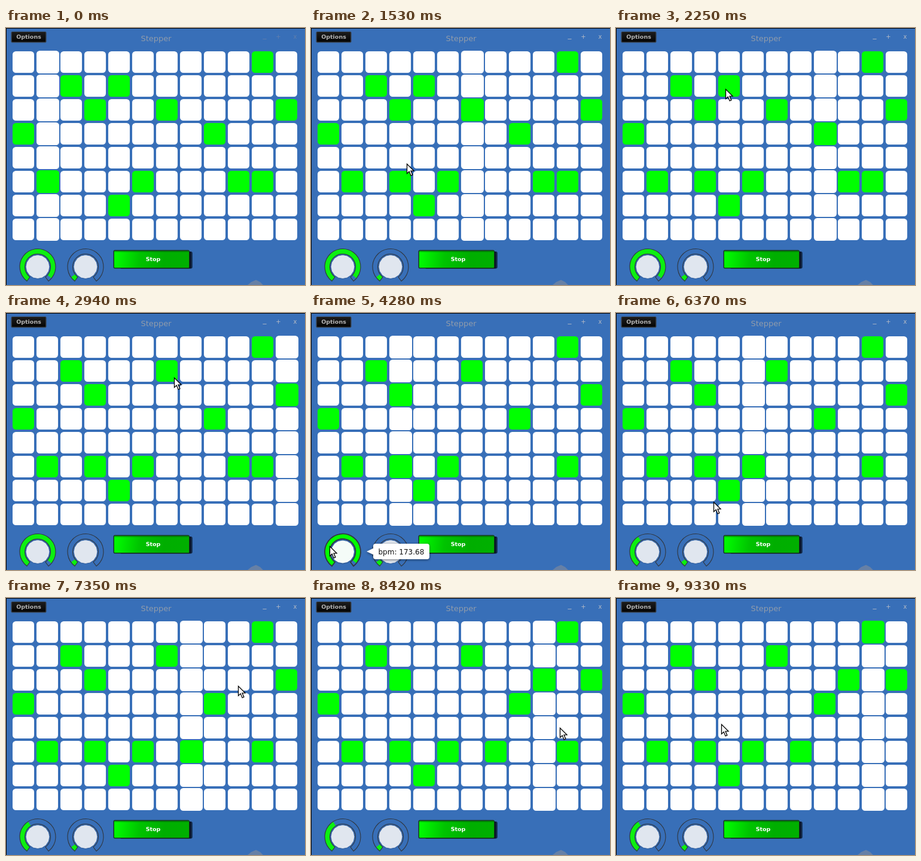
An HTML page with a canvas that plays this animation: 500 by 430 pixels, repeating every 9.43 s.

```html
<!DOCTYPE html>
<html lang="en">
<head>
<meta charset="utf-8">
<title>Stepper</title>
<style>
  html, body { margin: 0; width: 100%; height: 100%; overflow: hidden; background: #386fb8; }
  canvas { display: block; }
</style>
</head>
<body>
<canvas id="stage" width="500" height="430"></canvas>
<script>
const LOOP = 9430;
const PITCH = 40;
const GREEN = '#00ff00';
const FONT = '"DejaVu Sans", sans-serif';
const ctx = document.getElementById('stage').getContext('2d');

// Lit rows of each column at the start
const melody = '3 5 1 2 16 5 2 - 3 5 05 2'.split(' ');

// Pointer stops; a click flips the cell under the pointer
const stop = (t, x, y, click = false) => ({ t, x, y, click });
const click = (t, x, y) => stop(t, x, y, true);
const stops = [
  stop(320, 457, 215), click(1320, 148, 255), stop(1530, 160, 227),
  click(2340, 184, 98), click(2600, 266, 136), click(2930, 281, 108),
  click(3560, 386, 256), stop(4280, 31, 390), stop(4550, 34, 390),
  stop(4890, 36, 432), stop(5510, 131, 422), stop(5670, 274, 248),
  stop(6200, 90, 346), click(6640, 306, 258), stop(6870, 306, 258),
  click(7400, 390, 144), stop(8100, 390, 144), click(8640, 430, 258),
  stop(9040, 433, 294), stop(9320, 176, 211)
];

const between = (t, from, to) => t >= from && t < to;
const lerp = (a, b, k) => a + (b - a) * k;

function ease(t, from, to) {
  const k = Math.min(1, Math.max(0, (t - from) / (to - from)));
  return k * k * (3 - 2 * k);
}

// Steps run at the fast tempo, then at the slow one once the knob is turned
function activeColumn(t) {
  if (t < 4550) return (2 + Math.floor((t - 40) / 320)) % 12;
  return Math.max(4, 5 + Math.floor((t - 6020) / 590));
}

function pointerAt(t) {
  if (t < stops[0].t) return null;
  const i = stops.findIndex(s => s.t > t);
  if (i < 0) return stops.at(-1);
  const a = stops[i - 1], b = stops[i];
  const k = ease(t, a.t, b.t);
  return { x: Math.round(lerp(a.x, b.x, k)), y: Math.round(lerp(a.y, b.y, k)) };
}

function isLit(t, col, row) {
  const flips = stops.filter(s => s.click && s.t <= t &&
    Math.floor((s.x - 9) / PITCH) === col && Math.floor((s.y - 37) / PITCH) === row);
  return melody[col].includes(row) !== (flips.length % 2 === 1);
}

function box(x, y, w, h, r, fill) {
  ctx.beginPath();
  ctx.roundRect(x, y, w, h, r);
  ctx.fillStyle = fill;
  ctx.fill();
}

function polygon(...points) {
  ctx.beginPath();
  points.forEach(p => ctx.lineTo(...p));
  ctx.closePath();
}

function paint(fill, stroke, width) {
  ctx.fillStyle = fill;
  ctx.fill();
  ctx.strokeStyle = stroke;
  ctx.lineWidth = width;
  ctx.stroke();
}

function text(str, x, y, size, color, align = 'center', weight = 'normal') {
  ctx.font = `${weight} ${size}px ${FONT}`;
  ctx.textAlign = align;
  ctx.fillStyle = color;
  ctx.fillText(str, x, y);
}

function gradient(x0, y0, x1, y1, ...colors) {
  const g = ctx.createLinearGradient(x0, y0, x1, y1);
  colors.forEach((c, i) => g.addColorStop(i / (colors.length - 1), c));
  return g;
}

function drawHeader(focused) {
  box(8.5, 6, 59, 18.5, 2, '#33383f');
  box(10, 7, 56, 16, 1, gradient(0, 7, 0, 23, '#1c1c1c', '#050505'));
  text('Options', 38, 18, 9.5, '#b4b4b4', 'center', 'bold');
  text('Stepper', 251, 22, 13, '#919cab');
  const color = focused ? '#b3bac5' : '#617fad';
  text('_', 432.5, 15.5, 12, color);
  text('+', 455.5, 18, 10, color);
  text('x', 483.5, 18, 10, color);
}

function drawGrid(t) {
  const active = activeColumn(t);
  for (let row = 0; row < 8; row++) {
    for (let col = 0; col < 12; col++) {
      const grow = col === active ? 1 : 0;
      const size = 36 + 2 * grow;
      box(11 + PITCH * col, 39 + PITCH * row - grow, size, size, 5.5, isLit(t, col, row) ? GREEN : '#fff');
    }
  }
}

function ring(cx, cy, from, to) {
  ctx.beginPath();
  ctx.arc(cx, cy, 30, from, to);
  ctx.arc(cx, cy, 21.5, to, from, true);
  ctx.closePath();
}

function drawKnob(cx, value, hover) {
  const cy = 399.5;
  const start = 127 * Math.PI / 180;
  const sweep = 286 * Math.PI / 180;
  const line = hover ? 1.8 : 1.1;
  ring(cx, cy, start, start + sweep * value);
  ctx.fillStyle = hover ? GREEN : '#0cf010';
  ctx.fill();
  ring(cx, cy, start, start + sweep);
  ctx.strokeStyle = '#30363f';
  ctx.lineWidth = line;
  ctx.stroke();
  const facets = Array.from({ length: 16 }, (_, i) => {
    const a = i * Math.PI / 8;
    return [cx + 20 * Math.cos(a), cy + 20 * Math.sin(a)];
  });
  polygon(...facets);
  paint(hover ? '#f5fcf8' : '#e0e6ef', '#34619f', line);
}

function drawStop() {
  box(190, 374, 122, 28.5, 3, gradient(306, 0, 312, 0, '#000', '#1a3a68'));
  box(179.5, 371.5, 127.5, 31, 2.5, '#153c1c');
  box(181, 373, 125, 28, 1, gradient(181, 380, 306, 394, '#00ff00', '#00c400', '#00ae00', '#00b000'));
  box(181, 373, 125, 2, 1, 'rgba(0, 70, 0, .35)');
  text('Stop', 246, 390, 9.5, '#fff', 'center', 'bold');
}

function drawCorner() {
  polygon([404, 430], [410, 425], [418, 421.5], [425, 425], [430, 430]);
  ctx.fillStyle = '#6680a6';
  ctx.fill();
}

function drawTooltip(bpm) {
  const label = 'bpm: ' + bpm.toFixed(2);
  ctx.font = `12px ${FONT}`;
  const width = Math.round(ctx.measureText(label).width + 17.5);
  ctx.save();
  ctx.shadowColor = 'rgba(0, 0, 0, .5)';
  ctx.shadowBlur = 4;
  ctx.shadowOffsetY = 1;
  ctx.beginPath();
  ctx.roundRect(104, 386, width, 26, 4);
  ctx.moveTo(93, 399);
  ctx.lineTo(104.5, 393.5);
  ctx.lineTo(104.5, 404.5);
  ctx.closePath();
  ctx.fillStyle = '#fff';
  ctx.fill();
  ctx.restore();
  text(label, 112.5, 404, 12, '#111', 'left');
}

function drawPointer({ x, y }) {
  ctx.save();
  ctx.translate(x + 0.5, y + 0.5);
  polygon([0, 0], [0, 16], [3.7, 12.6], [6.6, 19.4], [9.4, 18.2], [6.5, 11.6], [11.5, 11.5]);
  paint('#fff', '#000', 1.3);
  ctx.restore();
}

function draw(t) {
  const bpm = lerp(173.68, 94.16, ease(t, 4550, 4890));
  ctx.fillStyle = '#386fb8';
  ctx.fillRect(0, 0, 500, 430);
  ctx.fillStyle = '#000';
  ctx.fillRect(0, 0, 500, 1);
  ctx.fillRect(0, 0, 1, 430);
  drawHeader(t >= 1320);
  drawGrid(t);
  drawKnob(53, (bpm - 40) / 140, between(t, 4080, 5100));
  drawKnob(133, 0.06, false);
  drawStop();
  drawCorner();
  if (between(t, 4080, 5560)) drawTooltip(bpm);
  const pointer = pointerAt(t);
  if (pointer) drawPointer(pointer);
}

function tick() {
  draw(performance.now() % LOOP);
  requestAnimationFrame(tick);
}
tick();
</script>
</body>
</html>
```
